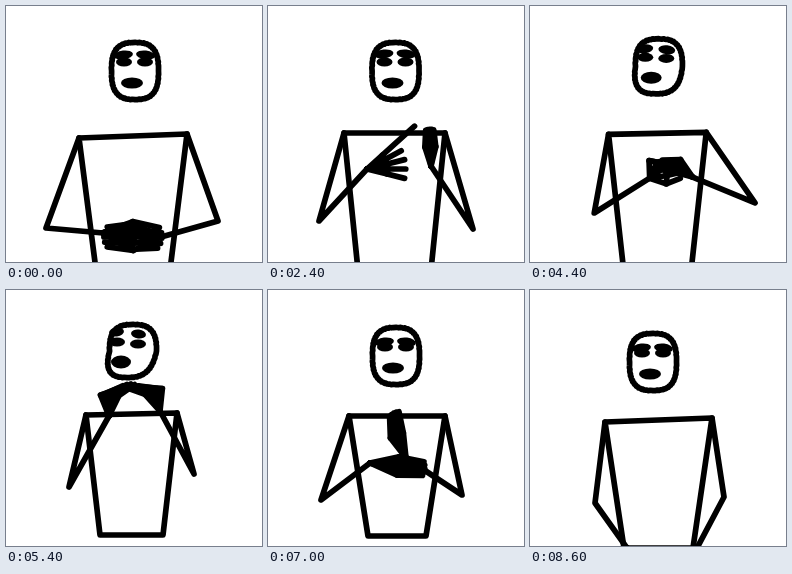
These frames come from a looping animation (256 by 256 pixels, 8.64 s). An HTML page with a canvas:

```html
<!DOCTYPE html>
<html lang="en">
<head>
<meta charset="utf-8">
<title>Signing figure</title>
<style>
html, body { margin: 0; width: 100%; height: 100%; overflow: hidden; background: #fff; }
canvas { display: block; width: 100vmin; height: 100vmin; }
</style>
</head>
<body>
<canvas id="stage" width="256" height="256"></canvas>
<script>
const ctx = document.getElementById('stage').getContext('2d');
const LOOP = 8640, STEP = 40;

// Angles are in degrees, clockwise from the right.
// A hand fans its fingers around aim; point lengthens the index finger.
const hand = (x, y, aim, reach, spread, curl = 0, point = 1) => [x, y, aim, reach, spread, curl, point];

// Each sign is held from at to until; flare moves the elbows on the way to the next.
const signs = [
  { // clasped hands
    at: 0, until: 440, head: [129, 65], brow: 7, inset: 17, flare: [-2, 5],
    shoulders: [73, 132, 181, 128], elbows: [40, 222, 212, 215],
    left: hand(97, 227, 5, 58, 13), right: hand(155, 231, 180, 56, 13)
  },
  { // both index fingers out
    at: 1100, until: 1600, head: [130, 64], brow: 7, flare: [-7, 15],
    shoulders: [79, 126, 179, 128], elbows: [48, 215, 204, 222],
    left: hand(113, 165, -10, 32, 14, 0, 1.75), right: hand(166, 153, 275, 30, 6, 0, 1.9)
  },
  { // one index finger to the other hand
    at: 2360, until: 2560, head: [127.5, 65], brow: 8, flare: [-20, 17],
    shoulders: [76, 127, 177, 127], elbows: [51, 215, 205, 223],
    left: hand(99, 163, -14, 38, 14, 0, 1.65), right: hand(163, 160, 268, 36, 8)
  },
  { // forearms crossed low
    at: 3360, until: 3420, head: [131, 68], brow: 7, inset: 16, flare: [6, 28],
    shoulders: [77, 132, 182, 130], elbows: [53, 218, 207, 211],
    left: hand(138, 223, 20, 22, 45), right: hand(172, 226, 175, 36, 8)
  },
  { // hands curled under the chin
    at: 5320, until: 5480, head: [127, 61], turn: 1, brow: 10, waist: 245, flare: [-10, 10],
    shoulders: [80, 125, 171, 123], elbows: [63, 197, 188, 184],
    left: hand(103, 126, -88, 41, 12, 60), right: hand(154, 121, 252, 41, 12, 60)
  },
  { // upright hand on a flat palm
    at: 6960, until: 7100, head: [128, 66], brow: 5, inset: 19, waist: 246, flare: [-10, 8],
    shoulders: [81, 126, 177, 126], elbows: [53, 210, 194, 205],
    left: hand(102, 173, 6, 54, 9), right: hand(138, 168, 248, 46, 8, -15)
  },
  { // arms lowered
    at: 8440, until: LOOP, head: [123, 72], brow: 5, inset: 19, waist: 258, flare: [0, 0],
    shoulders: [75, 132, 182, 128], elbows: [65, 213, 194, 207],
    left: hand(97, 258, 90, 30, 8), right: hand(167, 258, 90, 30, 8)
  }
].map(sign => ({ turn: 0, inset: 14, waist: 264, ...sign }));

function blend(a, b, u) {
  if (!Array.isArray(a)) return a + (b - a) * u;
  return a.map((v, i) => v + (b[i] - v) * u);
}

function poseAt(t) {
  const i = signs.findLastIndex(sign => sign.at <= t);
  const a = signs[i], b = signs[i + 1] || a;
  const u = t > a.until ? (t - a.until) / (b.at - a.until) : 0;
  const pose = {};
  for (const part in a) pose[part] = blend(a[part], b[part], u * u * (3 - 2 * u));
  const swing = Math.sin(Math.PI * u);
  pose.elbows[0] += a.flare[0] * swing;
  pose.elbows[2] += a.flare[1] * swing;
  pose.head[1] -= 4 * swing;
  pose.waist += 9 * swing;
  return pose;
}

function line(...p) {
  ctx.beginPath();
  for (let i = 0; i < p.length; i += 2) ctx.lineTo(p[i], p[i + 1]);
  ctx.stroke();
}

function blob(x, y, rx, ry, tilt = 0) {
  ctx.beginPath();
  ctx.ellipse(x, y, rx, ry, tilt, 0, 7);
  ctx.fill();
}

function polar(x, y, r, deg) {
  const a = deg * Math.PI / 180;
  return [x + r * Math.cos(a), y + r * Math.sin(a)];
}

function drawHead({ head: [x, y], turn, brow }) {
  const bend = v => Math.sign(v) * Math.abs(v) ** 0.72;
  ctx.beginPath();
  for (let i = 0; i < 120; i++) {
    const a = i / 60 * Math.PI, rough = 1 + 0.01 * Math.sin(i * 2.4);
    const px = bend(Math.cos(a)), py = bend(Math.sin(a));
    const lean = turn * 6 * Math.max(0, py);
    ctx.lineTo(x + px * 23.5 * rough - lean, y + py * (28.5 - turn * 2) * rough);
  }
  ctx.closePath();
  ctx.stroke();
  for (const side of [-1, 1]) {
    const ex = x - 0.5 + side * 10.5 - turn * 5, ey = y - 9 + turn * (1 + side);
    blob(ex, ey, 8, 4.5);
    blob(ex + side * 0.5, ey - brow, 9.5 - turn * 2, 4.5, side * 0.12);
  }
  blob(x - 3 - turn * 9, y + 12 - turn, 11 - turn, 5.5 + turn);
}

function drawHand([x, y, aim, reach, spread, curl, point], side) {
  const knuckles = [];
  for (let i = -2; i <= 2; i++) {
    const angle = aim + side * spread * i, size = i === -2 ? reach * point : reach;
    const knuckle = polar(x, y, size * 0.55, angle);
    const inward = point > 1 ? 0 : -spread * i * 1.3;
    line(x, y, ...knuckle, ...polar(...knuckle, size * 0.47, angle + side * (curl + inward)));
    knuckles.push(...polar(x, y, reach * 0.55, angle));
  }
  line(...knuckles);
}

function draw(now) {
  const pose = poseAt(Math.floor(now % LOOP / STEP) * STEP);
  const { shoulders: [ax, ay, bx, by], elbows: [lx, ly, rx, ry], left, right, inset, waist } = pose;
  ctx.fillStyle = '#fff';
  ctx.fillRect(0, 0, 256, 256);
  ctx.fillStyle = ctx.strokeStyle = '#000';
  ctx.lineWidth = 5.7;
  ctx.lineCap = ctx.lineJoin = 'round';
  drawHead(pose);
  line(ax, ay, bx, by, bx - inset, waist, ax + inset, waist, ax, ay);
  line(ax, ay, lx, ly, left[0], left[1]);
  line(bx, by, rx, ry, right[0], right[1]);
  drawHand(left, 1);
  drawHand(right, -1);
}

const start = performance.now();
(function tick() {
  draw(performance.now() - start);
  requestAnimationFrame(tick);
})();
</script>
</body>
</html>
```
